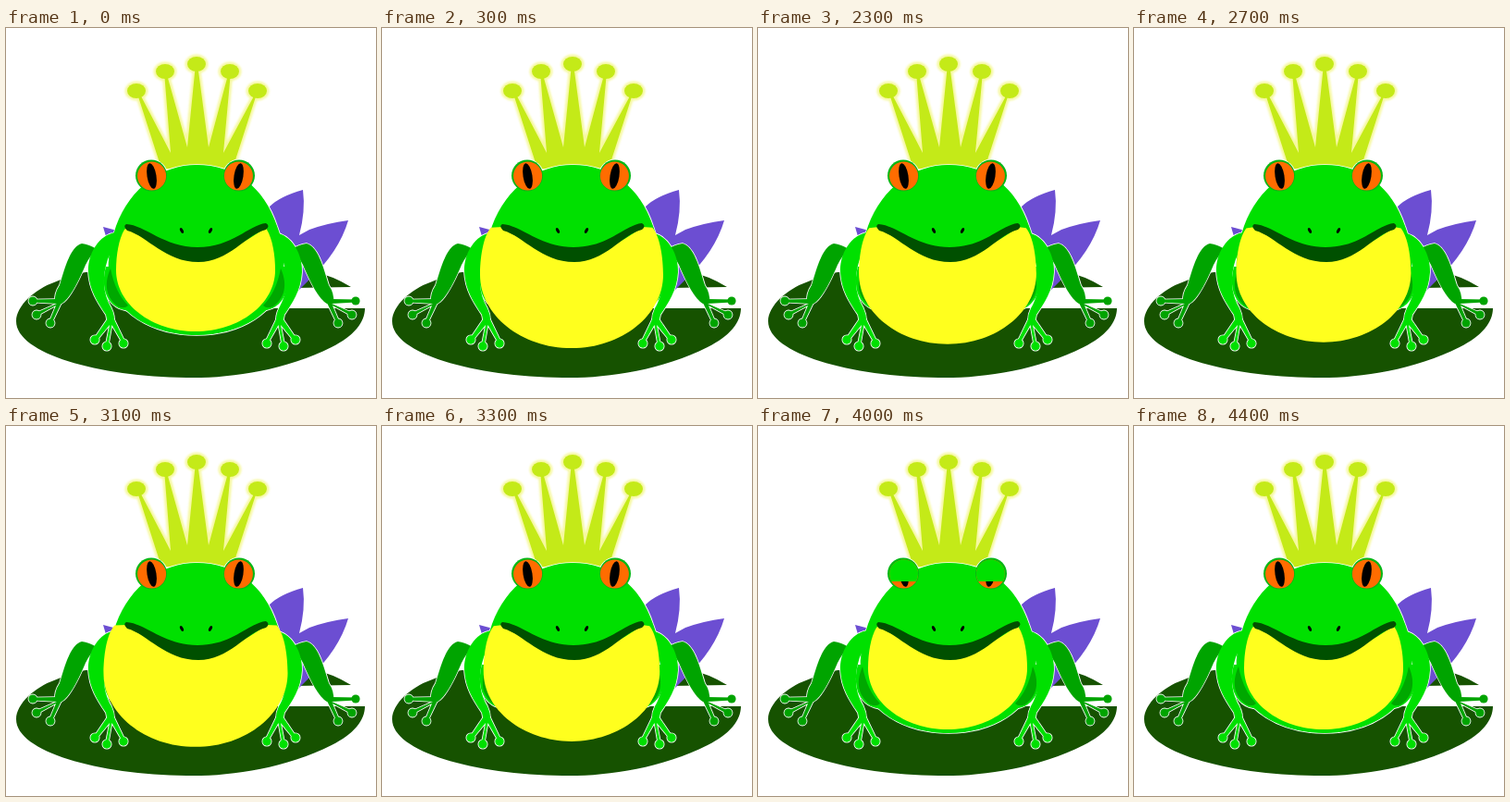
Recreate the animation shown at these times as an HTML page. Size 400x400 px, loop 5.4 s.

```html
<!DOCTYPE html>
<html lang="en">
<head>
<meta charset="utf-8">
<title>Frog prince</title>
<style>
html, body { margin: 0; width: 100%; height: 100%; overflow: hidden; background: #fff; }
svg { display: block; width: 100%; height: 100%; }
.outline { stroke: #fff; stroke-width: 1.6; }
.glow { fill: #f6f8a0; stroke: #f6f8a0; stroke-width: 5; stroke-linejoin: round; filter: blur(1px); }
</style>
</head>
<body>
<svg viewBox="0 0 400 400">
  <defs>
    <g id="crown">
      <path d="M168 152L141 68L143 68L178 135L171 47L173 47L196 129L205 39H207L219 129L241 47L243 47L235 135L271 68L272 68L245 152Z"/>
      <ellipse cx="141" cy="68" rx="10" ry="8"/>
      <ellipse cx="172" cy="47" rx="10" ry="8"/>
      <ellipse cx="206" cy="39" rx="10" ry="8"/>
      <ellipse cx="242" cy="47" rx="10" ry="8"/>
      <ellipse cx="272" cy="68" rx="10" ry="8"/>
    </g>
    <g id="hind">
      <path d="M82 233C70 236 64 258 58 278Q52 287 53 296Q57 301 63 296C72 288 80 270 86 256Q91 246 98 239Q90 234 82 233Z"/>
      <path d="M57 293L29 293.500V296.500L55 298L32 308L34 311L54 300L46.500 318L49.500 319L60 297Z"/>
      <circle cx="29" cy="295" r="4.6"/><circle cx="33" cy="310" r="4.6"/><circle cx="48" cy="319" r="4.6"/>
    </g>
    <g id="hinds">
      <use href="#hind"/>
      <use href="#hind" transform="matrix(-1 0 0 1 407 0)"/>
    </g>
    <g id="arm">
      <path d="M119 221C100 223 88 245 89 264C90 284 100 298 108 310L110 320L117 320Q118 311 114 303C104 286 104 268 110 250Q116 238 119 221Z"/>
      <path d="M110 314L95 336L98 338L112 321L107.500 344H110.500L114.500 321L126 341L128.500 339L117 315Z"/>
      <circle cx="96" cy="337" r="4.7"/><circle cx="109" cy="344" r="4.7"/><circle cx="127" cy="341" r="4.7"/>
    </g>
    <g id="arms">
      <use href="#arm"/>
      <use href="#arm" transform="matrix(-1 0 0 1 409 0)"/>
    </g>
    <g id="rims"><circle cx="157" cy="159.500" r="17"/><circle cx="252" cy="159.500" r="17"/></g>
    <g id="eyes"><circle cx="157.600" cy="160" r="15.500"/><circle cx="251.400" cy="160" r="15.500"/></g>
    <g id="body">
      <path d="M206 148C168 148 135 172 119 214C112 235 110 250 111 266C115 309 160 332 206 332C252 332 296 309 300 266C301 250 301 235 293 214C279 172 248 148 206 148Z"/>
      <path d="M108 258C102 280 108 304 134 306L160 300L118 258ZM302 258C308 280 302 304 276 306L250 300L292 258Z"/>
    </g>
    <clipPath id="shut"><rect id="lid" x="135" y="144" width="140" height="0"/></clipPath>
  </defs>

  <path fill="#165200" d="M11 317C11 300 32 282 52 275Q70 267 86 264L328 262Q354 268 373 280L312 281L284 303H388C388 318 376 333 352 345C300 371 240 379 195 378C100 377 11 352 11 317Z"/>
  <path fill="#6c4ed2" d="M283 202L285 193Q296 182 321 175Q324 198 317 224L328 218Q347 211 370 208Q360 242 328 272L315 285L295 250ZM105 215L120 219L110 232Z"/>

  <use href="#crown" class="glow"/>
  <use href="#crown" fill="#c4ea18"/>

  <g class="outline">
    <use href="#hinds"/><use href="#rims"/><use href="#body"/><use href="#arms"/>
  </g>
  <use href="#hinds" fill="#00a400"/>
  <use href="#body" fill="#00e000"/>
  <path fill="#00a800" d="M113 260C105 278 109 292 121 301Q128 304 132 300Q118 286 113 260ZM297 260C305 278 301 292 289 301Q282 304 278 300Q292 286 297 260Z"/>
  <use href="#arms" fill="#00e000"/>
  <path id="belly" fill="#ffff1e"/>

  <path fill="#005000" d="M130 212C150 213 171 237 207 237C245 237 262 213 281 211Q286 214 281 218C260 223 241 253 208 253C172 253 153 225 131 219Q126 214 130 212Z"/>
  <ellipse cx="190" cy="219" rx="1.6" ry="3.2" transform="rotate(-28 190 219)"/>
  <ellipse cx="221" cy="219" rx="1.6" ry="3.2" transform="rotate(28 221 219)"/>

  <use href="#rims" fill="#00b814"/>
  <use href="#eyes" fill="#ff6c00"/>
  <ellipse cx="157.500" cy="160" rx="5" ry="14" transform="rotate(-9 157.500 160)"/>
  <ellipse cx="251.500" cy="160" rx="5" ry="14" transform="rotate(9 251.500 160)"/>
  <g clip-path="url(#shut)"><use href="#eyes" fill="#00e000"/></g>
</svg>
<script>
const LOOP = 5400, STEP = 100;
const puffKeys = [[0, 0], [100, .6], [200, 1], [600, .15], [700, 0], [2200, 0], [2300, .6], [2400, 1],
  [2700, .51], [2800, .4], [2900, .7], [3000, 1], [3100, .82], [3600, .17], [3700, 0], [LOOP, 0]];
const blinkKeys = [[0, 0], [3700, 0], [4100, 1], [4400, 0], [LOOP, 0]];
const belly = document.getElementById('belly');
const lid = document.getElementById('lid');

function valueAt(keys, t) {
  const i = keys.findIndex(key => key[0] > t);
  const [t0, v0] = keys[i - 1], [t1, v1] = keys[i];
  return v0 + (v1 - v0) * (t - t0) / (t1 - t0);
}

function bellyPath(k) {
  const cx = 205, w = 86 + 16.5 * k, corner = 77 + 13 * k;
  const top = 218 - 3 * k, mid = 262 + 6 * k, bottom = 328 + 23 * k;
  const c = .55, low = mid + (bottom - mid) * c;
  return `M${cx - corner} ${top}C${cx - w + 3} ${top + 10} ${cx - w} ${mid - 17} ${cx - w} ${mid}` +
    `C${cx - w} ${low} ${cx - w * c} ${bottom} ${cx} ${bottom}` +
    `C${cx + w * c} ${bottom} ${cx + w} ${low} ${cx + w} ${mid}` +
    `C${cx + w} ${mid - 17} ${cx + w - 3} ${top + 10} ${cx + corner} ${top}` +
    `L281 215Q245 244 207 244Q170 244 131 215Z`;
}

function draw(now) {
  const t = Math.floor(now % LOOP / STEP) * STEP;
  belly.setAttribute('d', bellyPath(valueAt(puffKeys, t)));
  lid.setAttribute('height', 32 * valueAt(blinkKeys, t));
}

const start = performance.now();
function tick() {
  draw(performance.now() - start);
  requestAnimationFrame(tick);
}
tick();
</script>
</body>
</html>
```
